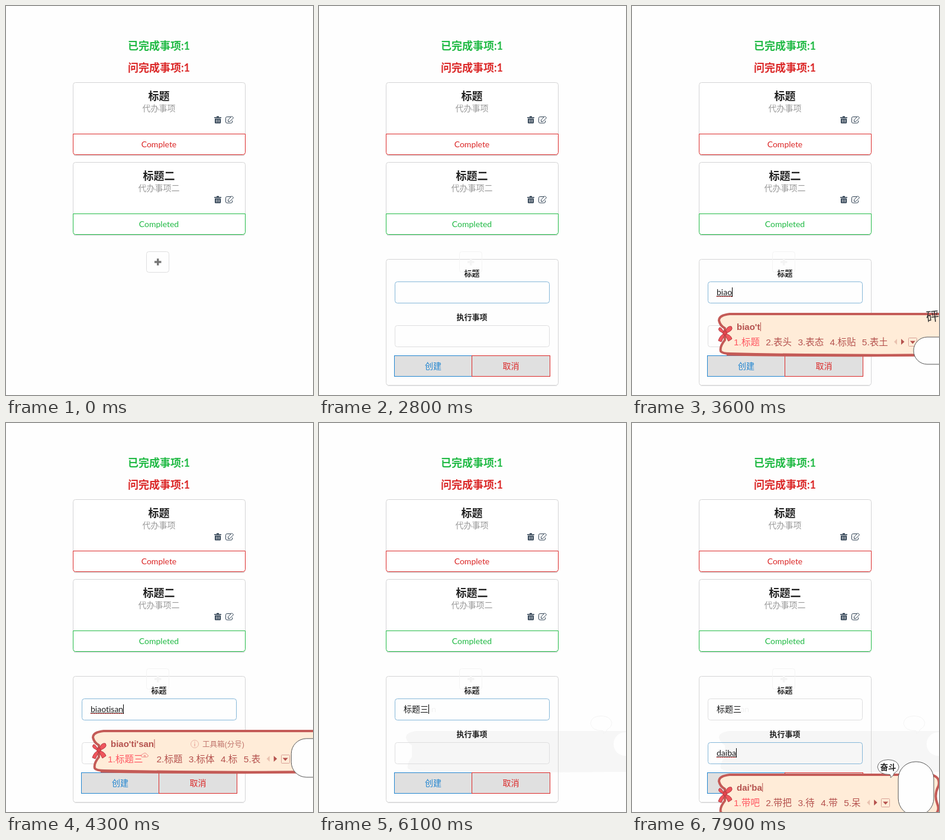
An HTML page for the animation above (8 s loop, 519x658 px).

```html
<!DOCTYPE html>
<html lang="zh">
<head>
<meta charset="utf-8">
<style>
  html, body { margin: 0; width: 100%; height: 100%; overflow: hidden; background: #fefefe; }
  svg { display: block; font: 14px Lato, "Noto Sans CJK SC", "Noto Sans CJK", sans-serif; font-variant-ligatures: none; }
  .mid { text-anchor: middle; }
  .ime { font-family: "Liberation Sans", "Noto Sans CJK SC", "Noto Sans CJK", sans-serif; }
</style>
</head>
<body>
<svg id="stage" width="519" height="658" viewBox="0 0 519 658"></svg>
<script>
const RED = '#db2828', GREEN = '#21ba45', BLUE = '#2185d0', ROSE = '#b5524e';
const stage = document.getElementById('stage');
const pen = document.createElement('canvas').getContext('2d');

// Summed per letter, so that ligatures play no part
function measure(str, font) {
  pen.font = font;
  return [...str].reduce((sum, letter) => sum + pen.measureText(letter).width, 0);
}
const text = (str, x, y, fill, size = 14, weight = 400, cls = 'mid') =>
  `<text class="${cls}" x="${x}" y="${y}" fill="${fill}" font-size="${size}" font-weight="${weight}">${str}</text>`;
// Crisp one-pixel frame covering the pixels x..x+w, y..y+h
const frame = (x, y, w, h, stroke, r = 4, fill = 'none') =>
  `<rect x="${x + .5}" y="${y + .5}" width="${w - 1}" height="${h - 1}" rx="${r}" stroke="${stroke}" fill="${fill}"/>`;
const path = (d, fill, stroke = 'none', width = 1) =>
  `<path d="${d}" fill="${fill}" stroke="${stroke}" stroke-width="${width}" stroke-linejoin="round"/>`;

const trash = path('M352 188h4v-1.5h4v1.5h4v1.6h-12zM353 190.5h10v7q0 1-1 1h-8q-1 0-1-1z', '#2c3e50') +
  path('M355.5 192v5M358 192v5M360.5 192v5', 'none', '#fff', .9);
const edit = path('M380 187.5h-6.500q-2 0-2 2v6.500q0 2 2 2h7q2 0 2-2v-2', 'none', '#2c3e50') +
  path('M375.500 195.500v-2.800l6.300-6.300 2.800 2.800-6.300 6.300z', '#fefefe', '#2c3e50');

function card(y, title, note, label, color) {
  return `<g transform="translate(0 ${y})">` +
    path('M115 123.500H403', 'none', '#cfd3d4', 1.5) +
    frame(113, 0, 292, 122, '#d4d4d5', 4, '#fff') +
    text(title, 258.5, 30, '#212121', 18, 700) +
    text(note, 258.5, 49, '#999') +
    `<g transform="translate(0 -129)">${trash}${edit}</g>` +
    path('M113.500 87.500h291v31q0 4-4 4h-283q-4 0-4-4z', '#fff', color) +
    text(label, 258.5, 110, color) + '</g>';
}

const addButton = (border, plus) => frame(237, 415, 39, 36, border) +
  path('M251 433h11.500M256.750 427.250v11.500', 'none', plus, 3.4);

function field(y, value, focused, caret, composing) {
  const end = 143 + measure(value, '14px Lato, "Noto Sans CJK SC", "Noto Sans CJK", sans-serif');
  let out = frame(128, y, 262, 37, focused ? '#85b7d9' : '#dededf') +
    text(value, 143, y + 23, '#1b1c1d', 14, 400, '');
  if (composing && value) {
    out += path(`M143 ${y + 24.500}H${end}`, 'none', '#444') +
      `<path d="M143 ${y + 25.500}H${end}" stroke="${RED}" stroke-dasharray="2 1"/>`;
  }
  if (caret) out += `<rect x="${Math.round(end)}" y="${y + 10}" width="1" height="16"/>`;
  return out;
}

function form(first, second) {
  return frame(113, 428, 292, 214, '#d4d4d5') + path('M116 642.500H402', 'none', '#e6e6e7') +
    text('标题', 258.5, 457, '#1f1f1f', 13, 700) + first +
    text('执行事项', 258.5, 531, '#1f1f1f', 13, 700) + second +
    frame(127, 591, 132, 36, BLUE, 0, '#e0e0e0') + frame(258, 591, 133, 36, RED, 0, '#e0e0e0') +
    text('创建', 193, 614, BLUE) + text('取消', 324.5, 614, RED);
}

const board = right => `M${right - 14} 521H165Q147 523 147 532Q149 541 157 545V565` +
  `Q148 576 150 584Q153 588 166 588Q340 592 ${right - 14} 590Q${right + 2} 586 ${right - 4} 570` +
  `Q${right - 10} 555 ${right - 2} 540Q${right + 2} 525 ${right - 14} 521Z`;

// rise: 0 = lying, 1 = upright
function mascot(rise) {
  const mix = (a, b) => a + (b - a) * rise;
  return `<rect x="${mix(474, 494)}" y="${mix(560, 499)}" width="${mix(68, 60)}" height="${mix(46, 91)}"` +
    ` rx="${mix(23, 29)}" fill="#fefefe" stroke="#555"/>`;
}
const bubble = (fill, stroke) =>
  path('M480 520.500Q482 523 481 526Q486 523 487 518.500Q495 514 495 507Q493 496 477 495.500' +
    'Q460 496 459 508Q461 521 480 520.500Z', fill, stroke);

const bow = path('M157 554Q149 540 147 545Q144 550 157 554Q160 540 168 542Q173 549 157 554' +
  'Q149 556 146 566L151 568 157 556 163 567 169 563Q167 556 157 554Z', '#f0555c', '#b23a42') +
  '<circle cx="157" cy="553" r="3.500" fill="#e2444c" stroke="#b23a42"/>';

function inputPanel(pinyin, words, rise, dy) {
  let x = 172, items = '';
  words.split(' ').forEach((word, i) => {
    items += text(`${i + 1}.${word}`, x, 574, i ? ROSE : '#ff5660', 15.5, 400, 'ime');
    x += 23.6 + 15.3 * word.length;
    if (word.length > 2) {
      items += path(`M${x - 12} 565q-3-4 2-5q4-4 7 1q4 2 0 4zm4 0v-3h2v3`, 'none', '#f08a86');
      x += 13;
    }
  });
  x -= 1;
  const caretX = 178 + measure(pinyin, 'bold 15px "Liberation Sans", sans-serif');
  let out = path(board(x + 124), '#ffecd8', '#c45b57', 4) +
    path(`M160 589.500Q340 592.500 ${x + 110} 590`, 'none', '#c45b57', 4) + bow +
    text(pinyin, 177, 548, ROSE, 15, 700, 'ime') +
    path(`M${caretX} 535v15`, 'none', ROSE) + items +
    path(`M${x + 6} 563v10l-5-5z`, '#e9c2b0') + path(`M${x + 13} 563v10l5.500-5z`, ROSE) +
    frame(Math.round(x + 25), 561, 15, 15, '#d9a196', 1) +
    path(`M${x + 28} 566.500h9l-4.500 5z`, ROSE);
  if (pinyin.endsWith('san')) {
    out += '<circle cx="319" cy="543" r="6.500" fill="none" stroke="#e9b3a5"/>' +
      path('M319 539v1.500M319 542v5', 'none', '#e9a59a', 1.3) +
      text('工具箱(分号)', 332, 547.5, '#c0756c', 12.5, 400, 'ime');
  }
  out += `<g transform="translate(${x - 440} 0)">${mascot(rise)}`;
  if (rise === 0) out += `<g transform="rotate(-6 505 525)">${text('砰', 495, 533, '#333', 22, 300, '')}</g>`;
  if (rise === 1) out += bubble('#fefefe', '#666') + text('奋斗', 477, 513, '#222', 13.5, 700);
  return `<g transform="translate(0 ${dy})">${out}</g></g>`;
}

const titleKeys = [
  ['b', '不 吧 把 被 本'], ['bi', '比 必 笔 闭 币'], ['bia', '表 标 边 变 便'],
  ['biao', '表 标 彪 飙 镖'], ["biao't", '标题 表头 表态 标贴 表土'],
  ["biao'ti", '标题 标体 表体 标 表'], ["biao'ti's", '标题 标体 表体 标 表'],
  ["biao'ti'sa", '标题 标体 表体 标 表'], ["biao'ti'san", '标题三 标题 标体 标 表']
];
const taskKeys = [
  [7400, 'd', '的 都 到 对 大'], [7800, 'dai', '带 待 代 呆 戴'], [7900, "dai'ba", '带吧 带把 待 带 呆']
];
const plain = pinyin => pinyin.replace(/'/g, '');

const header = text('已完成事项:1', 258.5, 74, GREEN, 18, 700) +
  text('问完成事项:1', 258.5, 111, RED, 18, 700) +
  card(129, '标题', '代办事项', 'Complete', RED) +
  card(264, '标题二', '代办事项二', 'Completed', GREEN);
// Faint imprint left behind by the closed panel
const imprint = path(board(565), '#f6f6f6') + bubble('none', '#f4f4f4') +
  '<circle cx="518" cy="543" r="20" fill="#fefefe"/>' +
  text('biaotisan', 143, 489, '#f2f2f2', 14, 400, '');

function picture(t) {
  const within = (a, b) => t >= a && t < b;
  if (t < 1200) return header + addButton('#dededf', '#767676');
  if (t < 1700) return header + addButton('#adadae', '#444');

  let title = '', task = '', panel = '';
  const typingTitle = within(3200, 5100);
  if (typingTitle) {
    const step = (t - 3200) / 100;
    const [pinyin, words] = titleKeys[Math.min(step, 8)];
    // The field trails the panel by one key
    title = plain(titleKeys[8][0]).slice(0, step);
    panel = inputPanel(pinyin, words, Math.min(Math.max((t - 4000) / 700, 0), 1), 0);
  } else if (t >= 5100) title = '标题三';

  const key = taskKeys.filter(k => t >= k[0]).pop();
  if (key) {
    task = plain(key[1]);
    panel = inputPanel(key[1], key[2], 1, 74);
  }
  const titleCaret = within(2400, 2800) || within(3200, 5600) || within(6100, 6500);
  const taskCaret = within(6500, 6900) || t >= 7400;
  return header + (t >= 5100 ? imprint : '') +
    form(field(466, title, within(2400, 6500), titleCaret, typingTitle),
      field(540, task, t >= 6500, taskCaret, true)) +
    addButton('#f4f4f4', '#f4f4f4') + panel;
}

let shown = -1;
function tick(now) {
  const t = Math.floor(now % 8000 / 100) * 100;
  if (t !== shown) stage.innerHTML = picture(shown = t);
  requestAnimationFrame(tick);
}
tick(performance.now());
</script>
</body>
</html>
```
